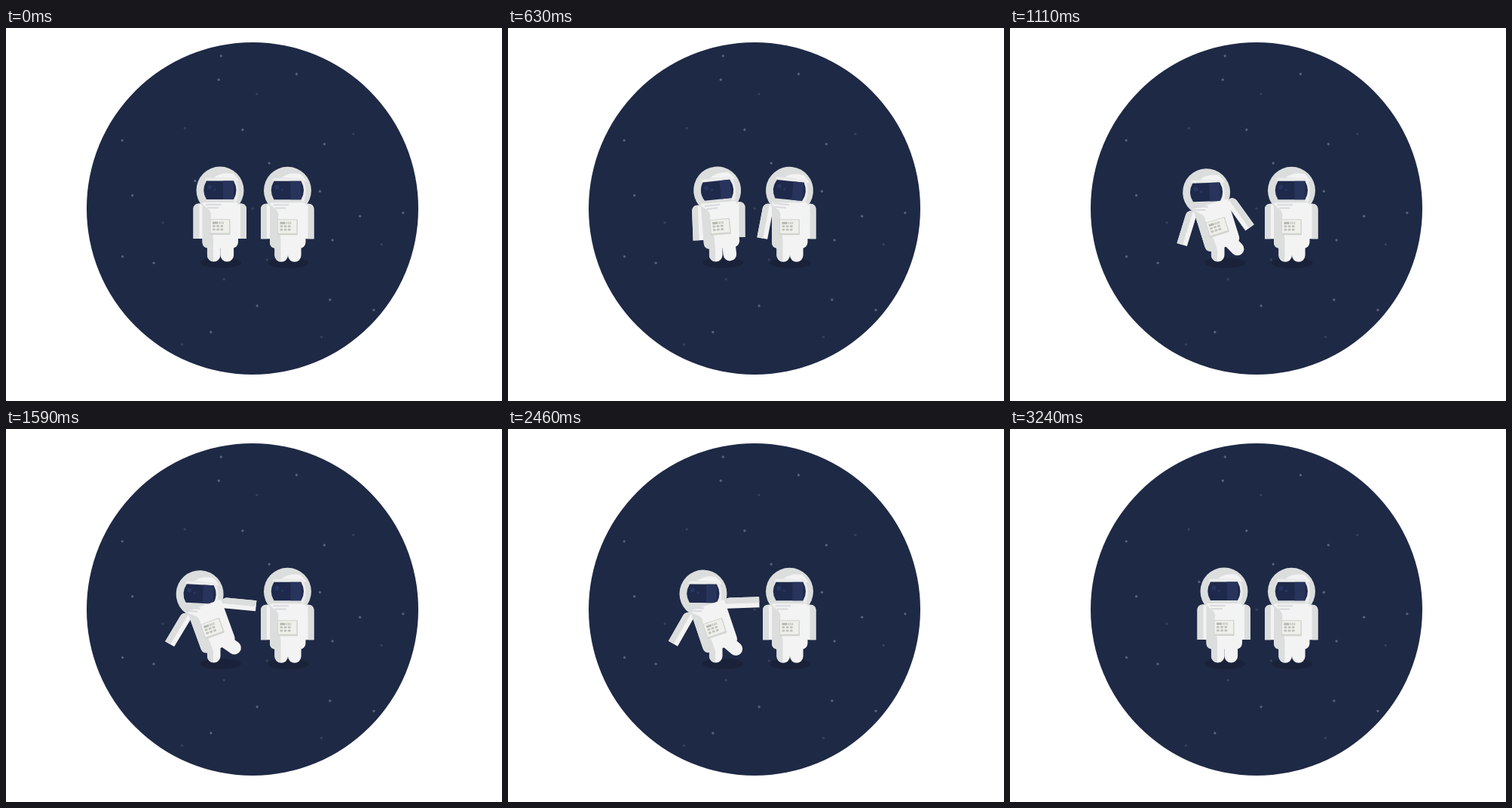
Write an HTML page with a canvas that moves like this. It is 658 px wide and 494 px high and loops after 3.93 s.

```html
<!DOCTYPE html>
<html lang="en">
<head>
<meta charset="utf-8">
<title>Two astronauts</title>
<style>
html, body { margin: 0; width: 100%; height: 100%; overflow: hidden; background: #fff; }
canvas { display: block; }
</style>
</head>
<body>
<canvas id="stage" width="658" height="494"></canvas>
<script>
const ctx = document.getElementById('stage').getContext('2d');
const LOOP = 3930, STEP = 30;
const SKY = '#1e2945', WHITE = '#f3f3f3', SHADE = '#dbdedd';
const REST = { body: 0, head: 0, leftArm: 0, rightArm: 0, leg: 0 };

function ease(t, from, to) {
  const u = Math.min(1, Math.max(0, (t - from) / (to - from)));
  return u * u * (3 - 2 * u);
}

// Swings from 0 to 1 between a and b, and back to 0 between c and d.
const swing = (t, a, b, c, d) => ease(t, a, b) - ease(t, c, d);

// Pushed off balance, the left astronaut leans away and throws out both arms.
// Angles are in degrees from the vertical.
function leftPose(t) {
  const lean = swing(t, 300, 1350, 2310, 3240);
  return {
    body: -20 * lean,
    head: 3 * lean - 38 * lean * (1 - lean),
    leftArm: 31 * swing(t, 600, 1500, 2400, 3240) - 12 * lean * (1 - lean),
    rightArm: -92 * swing(t, 600, 1800, 2540, 3240),
    leg: -55 * lean ** 1.5
  };
}

function rightPose(t) {
  const push = swing(t, 90, 400, 400, 800);
  return { ...REST, head: 15 * push, leftArm: 28 * push };
}

function turned(x, y, degrees, draw) {
  ctx.save();
  ctx.translate(x, y);
  ctx.rotate(degrees * Math.PI / 180);
  ctx.translate(-x, -y);
  draw();
  ctx.restore();
}

function fillPath(color, d) {
  ctx.fillStyle = color;
  ctx.fill(new Path2D(d));
}

function oval(color, x, y, rx, ry = rx) {
  ctx.fillStyle = color;
  ctx.beginPath();
  ctx.ellipse(x, y, rx, ry, 0, 0, Math.PI * 2);
  ctx.fill();
}

function box(color, x, y, w, h, radii = 0) {
  ctx.fillStyle = color;
  ctx.beginPath();
  ctx.roundRect(x, y, w, h, radii);
  ctx.fill();
}

// Evenly scattered stars: a sunflower spiral loosened by seeded noise.
function drawStars() {
  let seed = 7;
  const random = () => (seed = seed * 16807 % 2147483647) / 2147483647;
  const count = 30;
  for (let i = 0; i < count; i++) {
    const r = 212 * Math.sqrt((i + random()) / count);
    const angle = i * 2.39996 + random() * 0.5;
    oval(i % 3 ? '#566077' : '#364159', 327 + r * Math.cos(angle), 239 + r * Math.sin(angle), 1.7);
  }
}

function drawArm(x, side, angle) {
  turned(x, 238, angle, () => {
    // Drawn for the left side and mirrored for the right.
    ctx.translate(x, 0);
    ctx.scale(side, 1);
    box(WHITE, -7.5, 232.5, 14, 46.5, [7, 4, 0, 0]);
    box(SHADE, -7.5, 232.5, 8, 46.5, [7, 0, 0, 0]);
  });
}

function drawLeg(x) {
  box(WHITE, x - 8.8, 276, 17.6, 33.5, [0, 0, 8.8, 8.8]);
}

function drawHead() {
  oval(SHADE, 284, 215, 31.5);
  fillPath(WHITE, 'M276 198 Q286 190 301 193 Q307 198 309 203 Q297 198 276 198 Z');
  fillPath('#ececec', 'M265 198.5 H304 Q312 214 306 230 H302 V202 H264 Z');
  ctx.save();
  ctx.clip(new Path2D('M266 202.5 H302 Q309 215 302 227 H266 Q258.5 215 266 202.5 Z'));
  box('#1e294b', 258, 200, 52, 30);
  box('#28345c', 288, 200, 14, 30);
  oval('#27365f', 270, 210.5, 3);
  oval('#27365f', 277, 214, 1.8);
  ctx.restore();
}

function drawPanel() {
  box('#d2d4cf', 270.5, 253, 27, 21, 1);
  box('#efefec', 271.5, 254, 24.5, 17.5);
  box('#b4b6b0', 274, 256.5, 7, 3);
  for (let i = 0; i < 3; i++) {
    box('#c6c8c2', 282 + i * 2.5, 256.5, 1.8, 3);
    for (const y of [261, 265.5]) box('#bfc1bb', 274 + i * 5.2, y, 3.8, 2.8, 1);
  }
}

function drawAstronaut({ body, head, leftArm, rightArm, leg }) {
  turned(281, 293, body, () => {
    drawArm(256, 1, leftArm - body);
    drawArm(311.5, -1, rightArm - body);
    turned(293, 284, leg - body, () => drawLeg(293.3));
  });
  drawLeg(275.7);
  box(SHADE, 267, 276, 8, 33, [0, 0, 0, 8.8]);
  turned(281, 293, body, () => {
    turned(284, 215, head - body, drawHead);
    box(WHITE, 260.5, 231, 47.5, 60.5, [2, 3, 8, 8]);
    fillPath(SHADE, 'M260.5 233 L266 238 Q274 243 271.5 252 V270 Q275 274 275 280 V291.5 H268 Q260.5 291 260.5 284 Z');
    turned(284, 215, head - body, () => {
      box('#d9d9de', 265, 233, 20.5, 2);
      box('#d9d9de', 267, 237.2, 15, 2);
    });
    drawPanel();
  });
}

function drawScene(t) {
  ctx.clearRect(0, 0, 658, 494);
  oval(SKY, 327, 239, 220);
  drawStars();
  [leftPose, rightPose].forEach((pose, i) => {
    ctx.save();
    ctx.translate(i * 89.5, i * 0.3);
    oval('#1a2239', 285, 311, 27, 7);
    drawAstronaut(pose(t));
    ctx.restore();
  });
}

const start = performance.now();
function tick() {
  const t = (performance.now() - start) % LOOP;
  drawScene(Math.floor(t / STEP) * STEP);
  requestAnimationFrame(tick);
}
tick();
</script>
</body>
</html>
```
